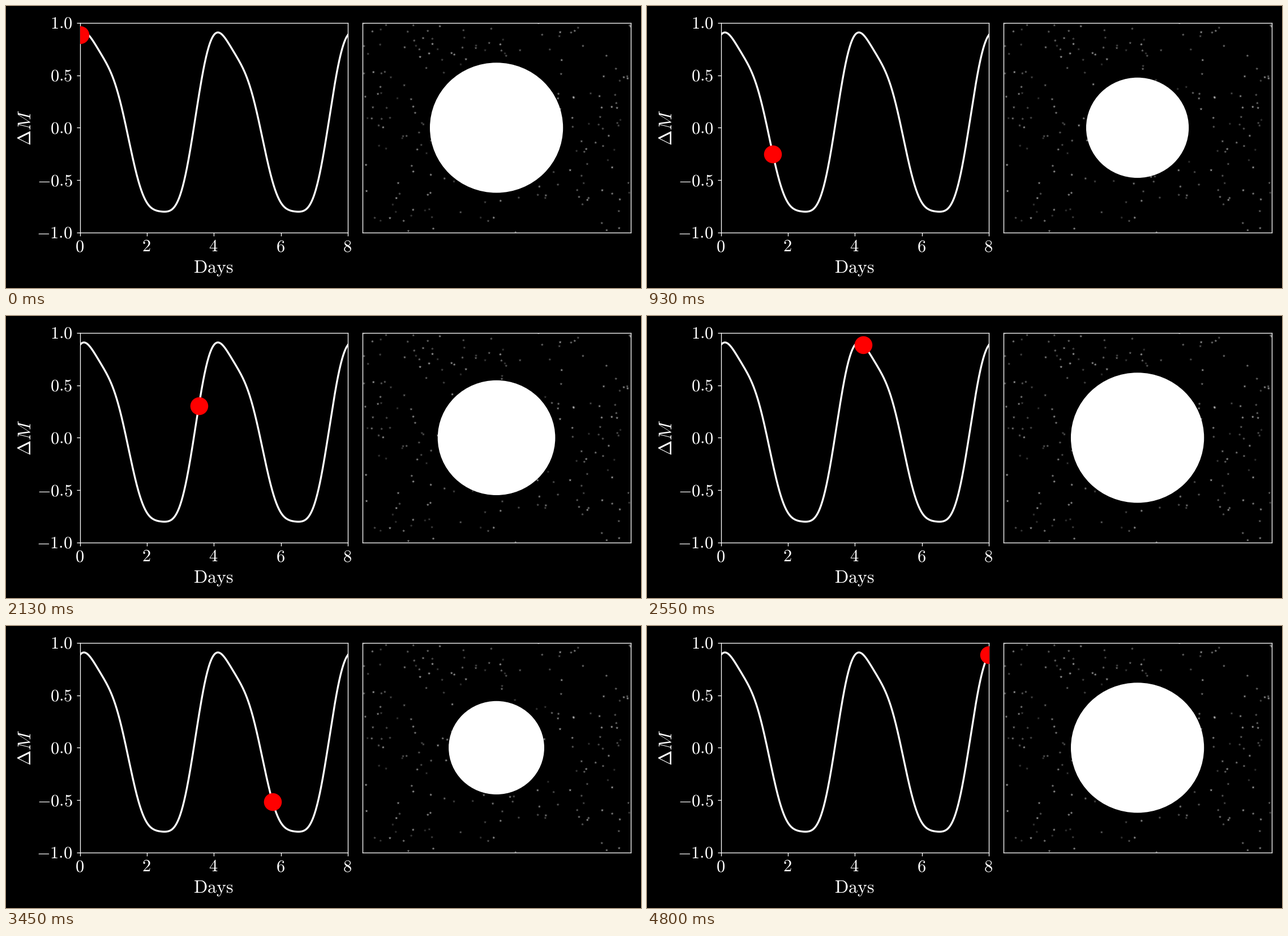
These frames come from a looping animation (1122 by 499 pixels, 4.83 s). A matplotlib script:

```python
import numpy as np
import matplotlib.pyplot as plt
from matplotlib.animation import FuncAnimation
from matplotlib.patches import Ellipse

W, H, DPI = 1122, 499, 128
FRAMES, INTERVAL = 161, 30
TOP, BOTTOM = 29.9, 400.9
LEFT, RIGHT = 130.6, 604.1
SKY_LEFT, SKY_RIGHT = 629.7, 1103.5
DAYS, PERIOD = 8, 4
STARS = 240

plt.rcParams["mathtext.fontset"] = "cm"
plt.rcParams["text.hinting"] = "none"


def pt(px):
    return px * 72 / DPI


def brightness(t):
    """Pulsating light curve: three harmonics of a four-day period."""
    w = 2 * np.pi * t / PERIOD
    return (0.7455 * np.cos(w) + 0.486 * np.sin(w)
            + 0.085 * np.cos(2 * w) - 0.014 * np.sin(2 * w)
            + 0.0545 * np.cos(3 * w) - 0.064 * np.sin(3 * w))


def panel(left, right):
    ax = fig.add_axes([left / W, 1 - BOTTOM / H,
                       (right - left) / W, (BOTTOM - TOP) / H])
    ax.set_facecolor("black")
    for spine in ax.spines.values():
        spine.set(color="white", linewidth=pt(1.33))
    return ax


def label(x, y, text, size, **kw):
    fig.text(x / W, 1 - y / H, text, color="white", fontsize=pt(size),
             va="baseline", **kw)


fig = plt.figure(figsize=(W / DPI, H / DPI), dpi=DPI, facecolor="black")

# Light curve
day_ticks = np.arange(0, DAYS + 1, 2)
value_ticks = np.linspace(-1, 1, 5)
curve_ax = panel(LEFT, RIGHT)
curve_ax.set(xlim=(0, DAYS), ylim=(-1, 1),
             xticks=day_ticks, yticks=value_ticks)
curve_ax.tick_params(color="white", length=pt(5.8), width=pt(1.33),
                     labelbottom=False, labelleft=False)
days = np.linspace(0, DAYS, 600)
curve_ax.plot(days, brightness(days), color="white", lw=pt(3.33))
marker, = curve_ax.plot([], [], "o", color="red", ms=pt(31.5), mew=0, zorder=10)

middle = (TOP + BOTTOM) / 2
for day in day_ticks:
    label(LEFT - 0.8 + (RIGHT - LEFT) * day / DAYS, 434.3, f"${day}$", 30.5,
          ha="center")
for value in value_ticks:
    label(117.8, middle + 9.8 - value * (BOTTOM - TOP) / 2,
          f"${value:.1f}$", 30.5, ha="right")
label(366.5, 472.5, r"$\mathrm{Days}$", 32, ha="center")
label(43.5, 215, r"$\Delta M$", 32.5, ha="center",
      rotation=90, rotation_mode="anchor")

# Star field, in stage pixels
sky = panel(SKY_LEFT, SKY_RIGHT)
sky.set(xlim=(SKY_LEFT, SKY_RIGHT), ylim=(BOTTOM, TOP), xticks=[], yticks=[])
rng = np.random.default_rng(5)
shades = np.ones((STARS, 4))
shades[:, 3] = rng.uniform(0.2, 0.6, STARS)
sky.scatter(rng.uniform(SKY_LEFT, SKY_RIGHT, STARS),
            rng.uniform(TOP, BOTTOM, STARS),
            s=pt(5.5) ** 2, marker="*", c=shades, linewidths=0)
star = Ellipse(((SKY_LEFT + SKY_RIGHT) / 2, middle), 1, 1,
               color="white", lw=0, zorder=2)
sky.add_patch(star)


def update(i):
    t = DAYS * i / (FRAMES - 1)
    v = brightness(t)
    marker.set_data([t], [v])
    width = 2 * (96.6 + 23.75 * v)
    star.set(width=width, height=width * 0.9785)
    return marker, star


anim = FuncAnimation(fig, update, frames=FRAMES, interval=INTERVAL,
                     repeat=True, repeat_delay=0)
plt.show()
```
